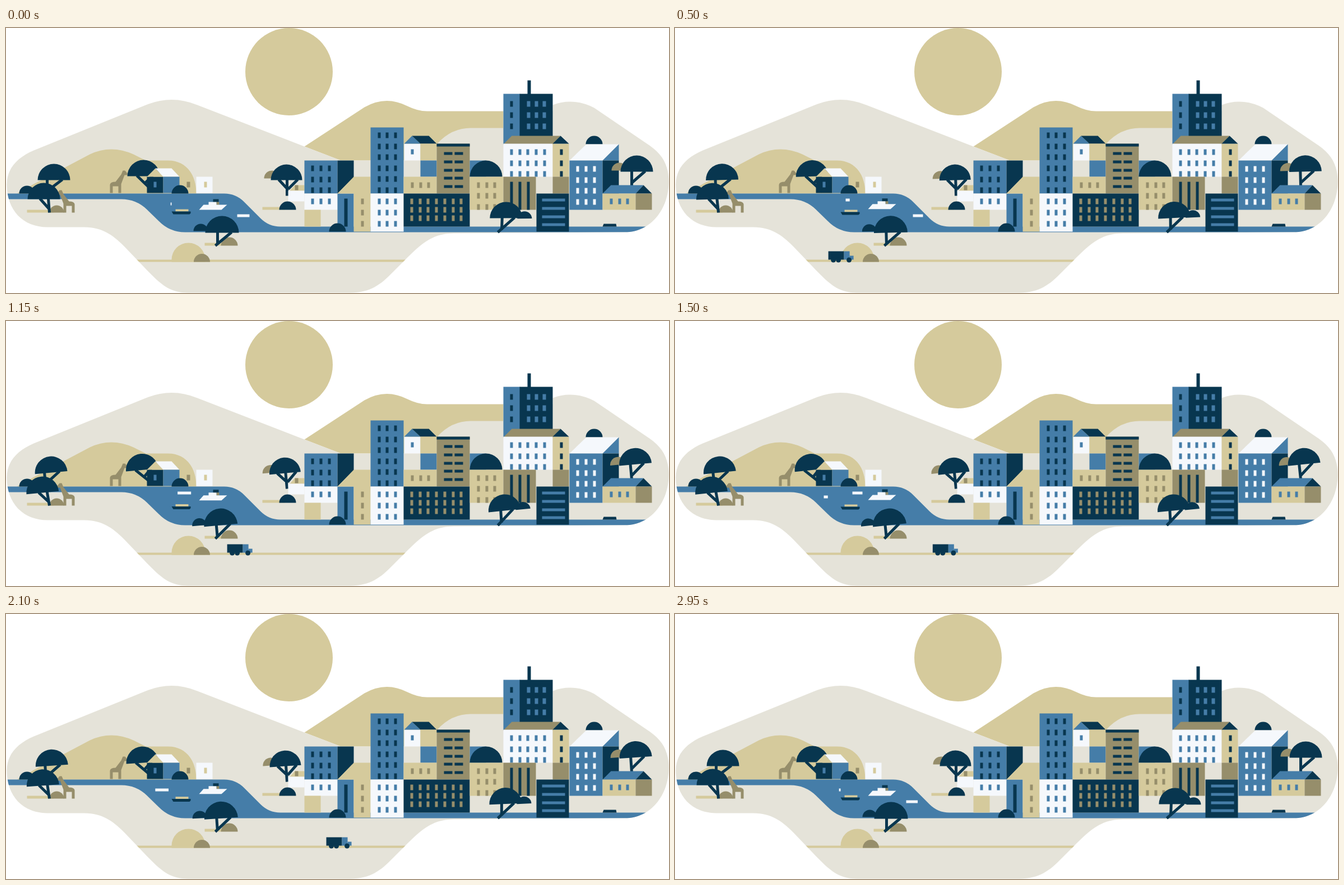
Write an HTML page that moves like this. It is 1183 px wide and 473 px high and loops after 3000 ms.

```html
<!DOCTYPE html>
<html lang="en">
<head>
<meta charset="utf-8">
<title>River town</title>
<style>
html, body { margin: 0; width: 100%; height: 100%; overflow: hidden; background: #fff; }
svg { display: block; width: 1183px; height: 473px; }
</style>
</head>
<body>
<svg id="stage" viewBox="0.5 0.5 1183 473"></svg>
<script>
const LOOP = 3000, STEP = 50, SWAY = 6;
const TAN = '#d5ca9c', SAND = '#e5e3d9', BLUE = '#457da8', NAVY = '#08364f', OLIVE = '#968e6b', WHITE = '#f5f8fc';
const stage = document.getElementById('stage');
let layer = stage;

function add(tag, attrs, parent = layer) {
  const el = document.createElementNS('http://www.w3.org/2000/svg', tag);
  for (const k in attrs) el.setAttribute(k, attrs[k]);
  parent.appendChild(el);
  return el;
}
const path = (fill, d) => add('path', { fill, d });
const rect = (fill, x, y, width, height) => add('rect', { fill, x, y, width, height });
const dome = (fill, x, y, r) => path(fill, `M${x - r} ${y}a${r} ${r} 0 0 1 ${2 * r} 0z`);
const grid = (fill, xs, ys, w = 5, h = 10) => ys.forEach(y => xs.forEach(x => rect(fill, x, y, w, h)));
const range = (from, n, gap) => Array.from({ length: n }, (_, i) => Math.round(from + i * gap));
function group(draw, attrs = {}) {
  const outer = layer, g = add('g', attrs);
  layer = g;
  draw();
  layer = outer;
  return g;
}

const LAND = 'M2 280C2 250 22 231 50 219L250 138Q296 119 342 138L533 212L598 237H742L770 207Q795 179 830 179H888V149H976V138' +
  'Q1012 124 1050 143L1150 211C1172 227 1183 245 1183 275C1183 325 1150 365 1105 365L800 367C760 367 740 387 712 415' +
  'L690 437C670 458 650 473 615 473H325C290 473 275 457 237 417L215 394C195 373 175 356 140 356H75C30 356 2 325 2 280Z';
add('path', { d: LAND }, add('clipPath', { id: 'land' }));

// the whole tree rocks about the foot of its trunk
const trees = [];
function tree(x, y, r, foot, limbs, bush, phase = 0) {
  const el = group(() => {
    add('path', { d: limbs, fill: 'none', stroke: NAVY, 'stroke-width': 5 });
    if (bush) dome(...bush);
    dome(NAVY, x, y, r);
  });
  trees.push({ el, foot, phase });
}

function landscape() {
  add('circle', { cx: 505.5, cy: 78.5, r: 78, fill: TAN });
  path(TAN, 'M533 212L640 142Q678 120 717 140Q735 149 752 149H888V237H598Z');
  path(SAND, LAND);
  path(TAN, 'M20 296L50 279L150 226Q188 208 228 226L250 237H290C320 237 340 260 340 296Z');
  add('path', {
    fill: BLUE, 'clip-path': 'url(#land)',
    d: 'M0 296H390A50 50 0 0 1 425 310.5L455 340.5A50 50 0 0 0 490 355H1183V365H320A66 66 0 0 1 273 345L252 324.5A66 66 0 0 0 205 306H0Z'
  });
  rect(TAN, 38, 325, 48, 5);
  rect(TAN, 355, 384, 30, 5);
  rect(TAN, 458, 320, 40, 5);
  add('path', { d: 'M225 414H730V418H225Z', fill: TAN, 'clip-path': 'url(#land)' });
}

function giraffe(transform) {
  add('path', {
    fill: OLIVE, transform,
    d: 'M186 295V280Q187 275 196 275L206 262L209 255H213L217 260V263H212L206 279V295H201V283H191V295Z'
  });
}

function leftBank() {
  giraffe('');
  tree(246, 265, 29, [260, 293], 'M234 264L264 293M262 264L248 278');
  rect(NAVY, 252, 266, 29, 29);
  path(TAN, 'M252 266L267 251L281 266Z');
  path(WHITE, 'M267 251H296L310 266H281Z');
  rect(BLUE, 281, 266, 29, 29);
  rect(BLUE, 264, 275, 5, 10);
  dome(NAVY, 311, 296, 15);
  rect(OLIVE, 323, 275, 6, 10);
  rect(WHITE, 340, 266, 29, 29);
  rect(TAN, 354, 275, 5, 10);
  tree(86, 272, 29, [74, 325], 'M74 271V298M101 271L76 290');
  dome(NAVY, 38, 296, 14);
  dome(OLIVE, 91, 330, 13);
  giraffe('matrix(-1 0 0 1 309 35)');
  tree(68, 306, 29, [78, 330], 'M76 305L78 330M61 305L78 324');
}

function westTown() {
  tree(501, 272, 28, [502, 300], 'M502 271V300M521 271L504 288M487 271L501 286', [OLIVE, 475, 269, 14]);
  path(TAN, 'M507 291L516 281H533V291Z');
  rect(WHITE, 504, 291, 29, 19);
  rect(OLIVE, 516, 281, 6, 9);
  dome(NAVY, 503, 325, 15);

  const cols = [545, 560, 575];
  rect(BLUE, 533, 237, 59, 59);
  path(NAVY, 'M592 237H621V267L592 296Z');
  grid(NAVY, cols, [246, 266, 285]);
  rect(WHITE, 533, 296, 59, 29);
  grid(BLUE, cols, [305]);
  rect(TAN, 533, 325, 29, 30);
  rect(BLUE, 592, 296, 29, 68);
  rect(NAVY, 604, 305, 6, 50);
  path(TAN, 'M592 296L621 266H651V364H621V296Z');
  grid(OLIVE, [634], [305, 325, 345]);
  dome(NAVY, 592, 364, 15);
}

function midTown() {
  const cols = [664, 678, 693];
  rect(BLUE, 651, 178, 59, 118);
  grid(NAVY, cols, range(187, 6, 19.6));
  rect(WHITE, 651, 296, 59, 68);
  grid(BLUE, cols, [305, 325, 345]);

  rect(WHITE, 711, 207, 29, 30);
  path(BLUE, 'M711 207L725 193L740 207Z');
  path(NAVY, 'M725 193H755L769 207H740Z');
  rect(TAN, 740, 207, 29, 30);
  rect(BLUE, 723, 217, 5, 9);
  rect(BLUE, 740, 237, 29, 29);
  rect(TAN, 710, 266, 59, 30);
  grid(OLIVE, [723, 738, 752], [276]);

  rect(OLIVE, 769, 207, 59, 89);
  rect(NAVY, 769, 207, 59, 5);
  grid(NAVY, [782, 801], range(222, 5, 14.8), 15, 5);
  rect(NAVY, 710, 296, 118, 59);
  grid(OLIVE, range(722, 7, 14.7), [305, 320, 335]);

  rect(BLUE, 828, 237, 29, 29);
  dome(NAVY, 857, 266, 29);
  rect(TAN, 828, 266, 60, 59);
  grid(OLIVE, [841, 856, 870], [276, 295, 315]);
}

function eastTown() {
  rect(NAVY, 931, 94, 6, 25);
  rect(BLUE, 888, 118, 30, 90);
  rect(NAVY, 917, 118, 59, 90);
  const rows = [131, 151, 171];
  grid(NAVY, [900], rows);
  grid(BLUE, [930, 944, 958], rows, 6);

  path(OLIVE, 'M888 208L903 193H990L976 208Z');
  rect(WHITE, 888, 207, 88, 59);
  rect(TAN, 976, 207, 29, 59);
  path(NAVY, 'M976 207L990 193L1005 207Z');
  const low = [217, 237, 256];
  grid(BLUE, range(900, 5, 14.7), low);
  grid(NAVY, [989], low);
  rect(OLIVE, 888, 266, 58, 59);
  grid(NAVY, [900, 915, 930], [275], 5, 50);
  rect(OLIVE, 976, 266, 29, 30);
  rect(NAVY, 947, 296, 58, 68);
  grid(BLUE, [957], range(305, 4, 14.8), 41, 5);

  dome(NAVY, 1050, 208, 15);
  path(WHITE, 'M1006 237L1036 208H1094L1065 237Z');
  rect(BLUE, 1006, 237, 59, 88);
  path(BLUE, 'M1065 237L1094 208V237Z');
  rect(NAVY, 1065, 237, 29, 59);
  grid(WHITE, [1018, 1033, 1048], range(247, 4, 19.5));

  tree(1126, 257, 29, [1117, 283], 'M1117 256V283M1141 256L1118 276', [OLIVE, 1095, 255, 14]);
  path(BLUE, 'M1065 296L1080 281H1138L1124 296Z');
  path(NAVY, 'M1124 296L1138 281L1153 296Z');
  rect(TAN, 1065, 296, 59, 29);
  rect(OLIVE, 1124, 296, 29, 29);
  grid(BLUE, [1078, 1093, 1107], [305]);
  path(NAVY, 'M1067 350H1089L1090 355H1065Z');
  tree(893, 340, 29, [881, 365], 'M886 339L885 361M908 339L878 365', [NAVY, 926, 341, 13], 250);
}

landscape();
const dashes = [[305, 305, 0], [266, 312, 1000], [413, 333, 2000]].map(([x, y, delay]) =>
  ({ x, delay, el: rect(WHITE, x, y, 0, 5) }));
const barge = group(() => {
  rect(TAN, 303, 324, 23, 4);
  path(NAVY, 'M296 328H330V331L328 333H299Z');
});
const ferry = group(() => {
  rect(NAVY, 370, 306, 10, 7);
  rect(OLIVE, 376, 311, 5, 5);
  path(WHITE, 'M353 316H362V311H376V316H395L385 325H345Z');
});
leftBank();
westTown();
midTown();
eastTown();

path(TAN, 'M296 418V414A30 30 0 0 1 356 414V418Z');
let truck;
group(() => {
  truck = group(() => {
    rect(NAVY, 0, 399, 28, 15);
    rect(BLUE, 28, 399, 10, 15);
    rect(BLUE, 38, 407, 7, 7);
    for (const cx of [9, 18, 37]) add('circle', { cx, cy: 414.5, r: 4.5, fill: NAVY });
  });
}, { 'clip-path': 'url(#land)' });
dome(OLIVE, 350, 418, 14.5);
dome(OLIVE, 399, 389, 15);
tree(386, 366, 30, [375, 389], 'M378 365V386M403 365L374 389', [NAVY, 348, 363, 13]);

const wave = t => (1 - Math.cos(2 * Math.PI * t / LOOP)) / 2;
const ease = p => {
  p = Math.min(1, Math.max(0, p));
  return p * p * (3 - 2 * p);
};

function draw(t) {
  for (const { el, foot, phase } of trees) {
    el.setAttribute('transform', `rotate(${-SWAY * wave(t + phase)} ${foot})`);
  }
  // each dash grows from its left end, then shrinks toward its right end
  for (const { x, delay, el } of dashes) {
    const u = (t - delay + LOOP) % LOOP;
    const left = 30 * ease((u - 980) / 1200), width = 30 * ease((u - 30) / 1470) - left;
    el.setAttribute('x', x + left);
    el.setAttribute('width', width < .7 ? 0 : width);
  }
  barge.setAttribute('transform', `translate(0 ${4 * wave(t)})`);
  ferry.setAttribute('transform', `translate(0 ${-5 * wave(t)})`);
  truck.setAttribute('transform', `translate(${181 + .1862 * t} 0)`);
}

function tick() {
  draw(Math.floor(performance.now() % LOOP / STEP) * STEP);
  requestAnimationFrame(tick);
}
tick();
</script>
</body>
</html>
```
